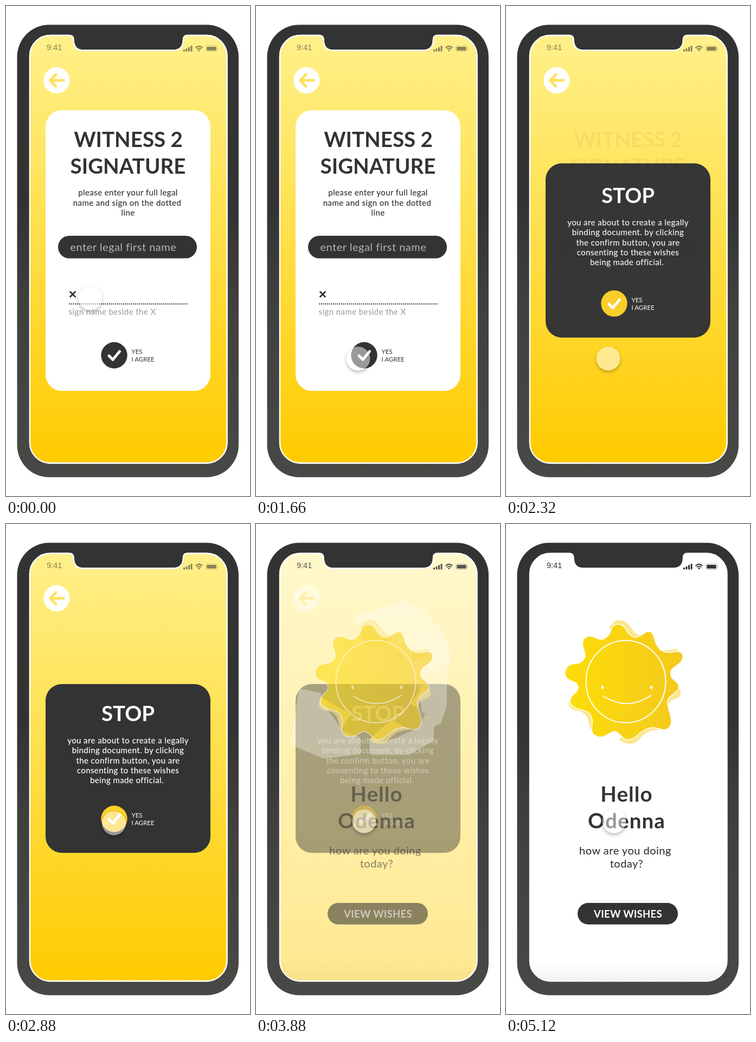
Animation, 450 px wide and 900 px high, one loop 5160 ms. Source, as an HTML page:

```html
<!DOCTYPE html>
<html lang="en">
<head>
<meta charset="utf-8">
<title>Witness signature flow</title>
<style>
  html, body { margin: 0; width: 100%; height: 100%; overflow: hidden; background: #fff; }
  svg { position: absolute; left: 0; top: 0; display: block; }
  text { font-family: Lato, "Open Sans", sans-serif; fill: #333; stroke-linejoin: round; }
  .title { font-size: 38.5px; font-weight: 700; text-anchor: middle; }
  .name { letter-spacing: .03em; }
  .body { font-size: 15px; letter-spacing: .028em; stroke: #333; stroke-width: .15; }
  .big { font-size: 20px; letter-spacing: .025em; stroke: #333; stroke-width: .1; }
  .mid { text-anchor: middle; }
  .light { fill: #fff; stroke: #fff; }
  .title.light { stroke: none; }
  .field { fill: #b4b4b4; stroke: none; }
  .hint { fill: #989898; stroke: none; }
  .agree { font-size: 11.5px; }
  .agree text { fill: inherit; }
  .action { font-size: 18.5px; font-weight: 700; letter-spacing: .015em; fill: #fff; text-anchor: middle; }
  .clock { font: 14.5px "Liberation Sans", Arial, sans-serif; }
  .line { fill: none; stroke-linecap: round; stroke-linejoin: round; }
  /* Every part dissolves on its own, so overlapping parts show through. */
  #yellow > *, #card, #agree > * { opacity: calc(1 - var(--home)); }
  #form > * { opacity: calc(1 - var(--stop)); }
  #warning > * { opacity: calc(var(--stop) * (1 - var(--home))); }
  #home > * { opacity: var(--home); }
  #status { opacity: calc(.58 + .42 * var(--home)); }
  #cursor {
    position: absolute; left: -22px; top: -22px; width: 44px; height: 44px; border-radius: 50%;
    background: rgba(255, 255, 255, .5); box-shadow: 0 3px 6px rgba(0, 0, 0, .28);
  }
</style>
</head>
<body>
<svg id="stage" width="450" height="900" viewBox="0 0 450 900">
  <defs>
    <linearGradient id="shell" x1="0" y1="0" x2="0" y2="1">
      <stop offset=".4" stop-color="#333"/><stop offset=".62" stop-color="#40403f"/><stop offset="1" stop-color="#484846"/>
    </linearGradient>
    <linearGradient id="sky" x1="0" y1="0" x2="0" y2="1">
      <stop offset="0" stop-color="#fff08a"/><stop offset="1" stop-color="#ffcb00"/>
    </linearGradient>
    <linearGradient id="floor" x1="0" y1="0" x2="0" y2="1">
      <stop offset=".955" stop-color="#fff"/><stop offset="1" stop-color="#f3f3f3"/>
    </linearGradient>
    <linearGradient id="gold">
      <stop offset="0" stop-color="#fddd08"/><stop offset="1" stop-color="#f4c91d"/>
    </linearGradient>
    <path id="screen" d="M82 54H116Q124.500 54 124.500 62C124.500 75 131 81.500 143 81.500H308C320 81.500 327 75 327 62Q327 54 335 54H370A37.500 37.500 0 0 1 407.500 91.500V802A37.500 37.500 0 0 1 370 839.500H81.500A37.500 37.500 0 0 1 44 802V91.500A37.500 37.500 0 0 1 82 54Z"/>
  </defs>

  <rect x="20.500" y="34.500" width="408.500" height="831" rx="59" fill="url(#shell)"/>
  <use href="#screen" fill="url(#floor)" stroke="#fff" stroke-width="2.400"/>

  <g id="yellow">
    <use href="#screen" fill="url(#sky)" stroke="#fff" stroke-width="2.400"/>
    <circle cx="93.300" cy="136.500" r="24.200" fill="#fff"/>
    <path class="line" stroke="#fde261" stroke-width="5" d="M106 136.500H82M92 126L81.500 136.500L92 147.500"/>
  </g>

  <g id="status" fill="#333">
    <text class="clock" x="75" y="81">9:41</text>
    <path d="M327 83.500v-3.500h3v3.500zM331.500 83.500v-5.500h3v5.500zM336 83.500v-8h3v8zM340.500 83.500v-10.500h3v10.500z"/>
    <path class="line" stroke="#333" stroke-width="2" style="stroke-linecap:butt" d="M349.500 76.800Q356 71 362.500 76.800M352 79.600Q356 76 360 79.600"/>
    <path d="M353.800 81.200Q356 79.400 358.200 81.200L356 83.600Z"/>
    <rect x="368.700" y="73.300" width="20.500" height="10" rx="2.500" fill="none" stroke="#333" stroke-opacity=".4"/>
    <rect x="370.300" y="74.900" width="17.300" height="6.800" rx="1.300"/>
    <path d="M390.300 76.500Q392.300 78.300 390.300 80.200Z" opacity=".4"/>
  </g>

  <g id="modal">
    <rect id="card" x="73" width="304" rx="30"/>
    <g id="form">
      <text class="title" x="225.500" y="259">WITNESS 2</text>
      <text class="title" x="225" y="308">SIGNATURE</text>
      <g class="mid">
        <text class="body" x="225" y="348">please enter your full legal</text>
        <text class="body" x="223.500" y="367">name and sign on the dotted</text>
        <text class="body" x="225" y="385">line</text>
      </g>
      <rect x="96" y="422" width="256" height="41.500" rx="20.700" fill="#333"/>
      <text class="big field" x="118.500" y="450">enter legal first name</text>
      <path class="line" stroke="#333" stroke-width="2.800" d="M118.500 525L127.500 534M127.500 525L118.500 534"/>
      <path stroke="#333" stroke-width="2" stroke-dasharray="2 1.700" d="M116 547.300H335.500"/>
      <text class="body hint" x="115.500" y="567">sign name beside the X</text>
    </g>
    <g id="warning">
      <text class="title light" x="225" y="362">STOP</text>
      <g class="mid" id="notice"></g>
    </g>
    <g id="agree" class="agree">
      <circle id="knob" cx="199.500" cy="0" r="24.200"/>
      <path class="line" stroke="#fff" stroke-width="5" d="M190 1L197 8L209.500 -7"/>
      <text x="231.500" y="-2.500">YES</text>
      <text x="231.500" y="11.800">I AGREE</text>
    </g>
  </g>

  <g id="home">
    <g fill="#fff" fill-opacity=".55">
      <path d="M175 172L272 140L309 154L323 176L345 198L361 240L352 282V334L341 366L328 372L330 352L306 346L290 230L200 200Z"/>
      <path d="M280 199L344 197L358 256L322 270Z" fill-opacity=".3"/>
      <path d="M79 302L118 310L135 345L160 380L193 392V423L125 431L63 405L72 350Z"/>
      <path d="M208 395L240 400L300 375L312 348L330 352L327 398L282 424H211Z"/>
    </g>
    <path fill="#fde68c" d="M191 190C199 173 217 172 228 187C236 200 243 206 255 205L240 225H200ZM285 231Q302 233 316 229L318 245L290 250ZM312 292C326 306 326 318 311 322C300 325 299 332 300 340L285 330ZM121 318C111 330 115 341 132 343C151 346 152 362 156 378L175 350ZM208 396C222 406 236 406 244 397C255 384 264 378 285 378L250 360Z"/>
    <path id="sun" fill="url(#gold)" stroke="#fff" stroke-width="1.500"/>
    <g class="line" stroke="#fff" stroke-width="2">
      <ellipse cx="221" cy="289.500" rx="73.500" ry="75.500"/>
      <path d="M180 316.500Q224 344 267.500 314.500"/>
    </g>
    <g fill="#fff">
      <ellipse cx="178" cy="300" rx="2.200" ry="3.200"/>
      <ellipse cx="268" cy="300" rx="2.200" ry="3.200"/>
    </g>
    <text class="title name" x="222.500" y="510">Hello</text>
    <text class="title name" x="222.500" y="558.500">Odenna</text>
    <g class="mid">
      <text class="big" x="220" y="607">how are you doing</text>
      <text class="big" x="222.500" y="631">today?</text>
    </g>
    <rect x="132" y="696" width="185" height="39.500" rx="19.700" fill="#333"/>
    <text class="action" x="225" y="723">VIEW WISHES</text>
  </g>
</svg>
<div id="cursor"></div>

<script>
  const LOOP = 5160;
  const $ = id => document.getElementById(id);

  const notice = [
    'you are about to create a legally',
    'binding document. by clicking',
    'the confirm button, you are',
    'consenting to these wishes',
    'being made official.'
  ];
  notice.forEach((line, i) => {
    const el = document.createElementNS('http://www.w3.org/2000/svg', 'text');
    el.setAttribute('class', 'body light');
    el.setAttribute('x', i === 4 ? 223 : 225);
    el.setAttribute('y', 403 + i * 18.3);
    el.textContent = line;
    $('notice').append(el);
  });

  // Closed Catmull-Rom curve through the given points.
  function smooth(points) {
    const n = points.length;
    const at = i => points[(i + n) % n];
    let d = 'M' + points[0];
    for (let i = 0; i < n; i++) {
      const [a, b, c, e] = [at(i - 1), at(i), at(i + 1), at(i + 2)];
      d += `C${b[0] + (c[0] - a[0]) / 6} ${b[1] + (c[1] - a[1]) / 6} ` +
           `${c[0] - (e[0] - b[0]) / 6} ${c[1] - (e[1] - b[1]) / 6} ${c[0]} ${c[1]}`;
    }
    return d + 'Z';
  }

  $('sun').setAttribute('d', smooth([
    [190, 203], [197, 188], [207, 184], [217, 188], [228, 203], [241, 208],
    [260, 198], [270, 201], [277, 220], [286, 232], [302, 236], [318, 234],
    [326, 241], [322, 254], [306, 267], [305, 281], [317, 293], [317, 305],
    [301, 319], [298, 331], [305, 360], [301, 374], [291, 378], [272, 374],
    [256, 378], [234, 394], [221, 396], [209, 386], [199, 381], [178, 391],
    [163, 388], [158, 378], [159, 361], [152, 346], [128, 338], [119, 329],
    [121, 317], [132, 305], [130, 293], [113, 284], [109, 271], [117, 259],
    [137, 254], [146, 242], [141, 220], [146, 209], [157, 206], [177, 212]
  ]));

  const settle = (t, start, rate) => {
    const x = Math.max(0, t - start) * rate;
    return 1 - (1 + x) * Math.exp(-x);
  };
  const mix = (a, b, p) => a + (b - a) * p;
  const blend = (a, b, p) => `rgb(${a.map((v, i) => Math.round(mix(v, b[i], p)))})`;

  const WHITE = [255, 255, 255], DARK = [51, 51, 51], AMBER = [252, 208, 42];
  const SHIFT = .0183, FADE = .0235;
  // Each move: start time, target x, target y, rate.
  const moves = [[400, 208, 536, .035], [960, 188.5, 647.5, SHIFT], [2600, 199.5, 546, SHIFT]];

  function draw(t) {
    const stop = settle(t, 2060, SHIFT);
    const tint = settle(t, 2060, FADE);
    const home = settle(t, 3800, FADE);

    $('stage').style.setProperty('--stop', stop);
    $('stage').style.setProperty('--home', home);

    const top = mix(191.5, 294, stop), bottom = mix(707, 604, stop);
    $('card').setAttribute('y', top);
    $('card').setAttribute('height', bottom - top);
    $('card').setAttribute('fill', blend(WHITE, DARK, tint));
    $('knob').setAttribute('fill', blend(DARK, AMBER, tint));
    $('agree').setAttribute('fill', blend(DARK, WHITE, tint));
    $('agree').setAttribute('transform', `translate(0 ${mix(641.5, 541.5, stop)})`);

    let x = 155.5, y = 536.5;
    for (const [start, toX, toY, rate] of moves) {
      const p = settle(t, start, rate);
      x = mix(x, toX, p);
      y = mix(y, toY, p);
    }
    $('cursor').style.transform = `translate(${x}px, ${y}px)`;
  }

  const begin = performance.now();
  function tick() {
    draw((performance.now() - begin) % LOOP);
    requestAnimationFrame(tick);
  }
  tick();
</script>
</body>
</html>
```
